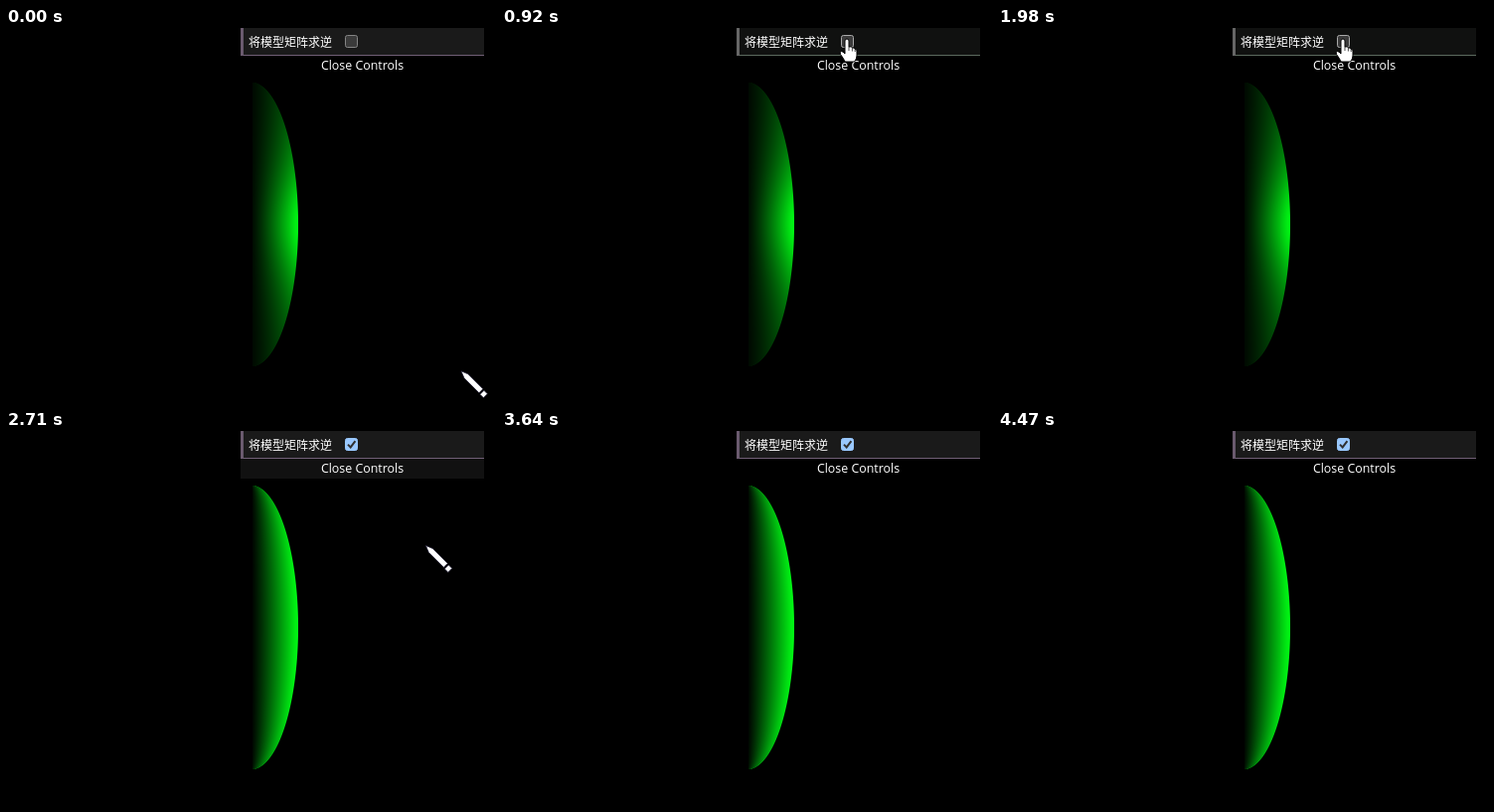
Animation of 493x378 px, one loop 4.5 s. Source, as an HTML page with a canvas:

```html
<!DOCTYPE html>
<html lang="zh">
<head>
<meta charset="utf-8">
<style>
html, body { margin: 0; width: 100%; height: 100%; overflow: hidden; background: #000; }
canvas, svg { position: absolute; left: 0; top: 0; display: block; }
text { fill: #fff; }
.label { font: 12px "Noto Sans CJK SC", "Noto Sans CJK", sans-serif; }
.button { font: 12.4px "Open Sans", "Noto Sans", sans-serif; text-anchor: middle; }
</style>
</head>
<body>
<canvas id="scene" width="493" height="378"></canvas>
<svg width="493" height="378" viewBox="0 0 493 378">
  <rect id="row" x="236" y="0" width="245" height="27"/>
  <rect id="line" x="236" y="27" width="245" height="1"/>
  <rect id="edge" x="236" y="0" width="3" height="28"/>
  <text class="label" x="244" y="18.5">将模型矩阵求逆</text>
  <rect id="box" x="341.5" y="7.5" width="12" height="12" rx="2"/>
  <path id="tick" d="M344 13.6L346.7 16.4L351.4 10.2" fill="none" stroke="#303030" stroke-width="2"/>
  <rect id="close" x="236" y="28" width="245" height="20" fill="#111"/>
  <text class="button" x="358.5" y="42">Close Controls</text>
  <g id="pen" fill="#fff" stroke="#1c1a30" stroke-width=".8">
    <path d="M0 0L7 3L22 18L18 22L3 7Z"/>
    <path d="M23 19.5L26.5 23L22.5 27L19 23.5Z"/>
  </g>
  <g id="hand" fill="#fff" stroke="#000" stroke-linejoin="round">
    <path d="M-2 2Q-2 0 0 0Q2 0 2 2V8Q5 7 5.4 9Q8 8.4 8.2 10.4Q10 10 10 12V17Q10 20 7.5 23H-2Q-3 20 -6.5 15.5Q-7.5 13 -5.5 12.5Q-4 12.5 -2 15Z"/>
    <path d="M2 8V12M5.4 9V12.5M8.2 10.4V13" stroke-width=".7"/>
  </g>
</svg>
<script>
const LOOP = 4500, CLICK = 2230, W = 493, H = 378;
const CX = 246.5, CY = 198, RX = 47.5, RY = 143.5, SQUASH = RX / RY;
const $ = id => document.getElementById(id);
const ctx = $('scene').getContext('2d');
const clamp = v => Math.max(0, Math.min(1, v));

// Light on the squashed sphere: e runs from its axis to its rim, h is the half width.
const shades = {
  skewed: (e, h) => 0.03 + 0.97 * e ** 1.2 * SQUASH * h / Math.hypot(SQUASH * h, Math.sqrt(1 - h * h)),
  inverted: (e, h) => e ** 1.15 * h ** 0.45
};

function renderSphere(shade) {
  const img = ctx.createImageData(W, H);
  for (let y = 0; y < H; y++) {
    const v = (y + 0.5 - CY) / RY;
    if (Math.abs(v) >= 1) continue;
    const h = Math.sqrt(1 - v * v);
    for (let x = 248; x < CX + RX; x++) {
      const dx = x + 0.5 - CX;
      const cover = clamp(h * RX - dx + 0.5);
      if (!cover) break;
      const light = shade(Math.min(1, dx / (h * RX)), h) * cover;
      const i = (y * W + x) * 4;
      img.data[i + 1] = 255 * light;
      img.data[i + 2] = 20 * light;
      img.data[i + 3] = 255;
    }
  }
  return img;
}

const spheres = [renderSphere(shades.skewed), renderSphere(shades.inverted)];

// time, x, y of the pointer
const path = [
  [0, 458, 346], [30, 456, 341], [520, 347, 11], [2560, 347, 11],
  [2710, 422, 115], [2920, 494, 205]
];

function pointerAt(t) {
  const n = path.findIndex(k => k[0] > t);
  if (n < 0) return null;
  const [t0, x0, y0] = path[n - 1], [t1, x1, y1] = path[n];
  let p = (t - t0) / (t1 - t0);
  if (t1 === 520) p = p * p * (3 - 2 * p);
  return { x: x0 + (x1 - x0) * p, y: y0 + (y1 - y0) * p };
}

const show = (id, on) => $(id).setAttribute('visibility', on ? 'visible' : 'hidden');
const paint = (id, fill) => $(id).setAttribute('fill', fill);
let drawn = -1;

function render(t) {
  const pos = pointerAt(t);
  const checked = t >= CLICK ? 1 : 0;
  const overRow = !!pos && pos.y < 28;
  const overClose = !!pos && pos.y >= 28 && pos.y < 48;

  if (drawn !== checked) ctx.putImageData(spheres[drawn = checked], 0, 0);
  paint('row', overRow ? '#101110' : '#1a1a1a');
  paint('edge', overRow ? '#666' : '#6a5a6e');
  paint('line', overRow ? '#5c6a5e' : '#705f76');
  paint('box', checked ? '#99c8ff' : '#3b3b3b');
  $('box').setAttribute('stroke', checked ? '#99c8ff' : overRow ? '#aaa' : '#858585');
  show('tick', checked);
  show('close', overClose || (t >= 2610 && t < 2740));

  const hand = overRow || overClose;
  show('hand', hand);
  show('pen', pos && !hand);
  if (pos) $(hand ? 'hand' : 'pen').setAttribute('transform', `translate(${pos.x} ${pos.y})`);
}

const start = performance.now();
function tick() {
  render((performance.now() - start) % LOOP);
  requestAnimationFrame(tick);
}
tick();
</script>
</body>
</html>
```
